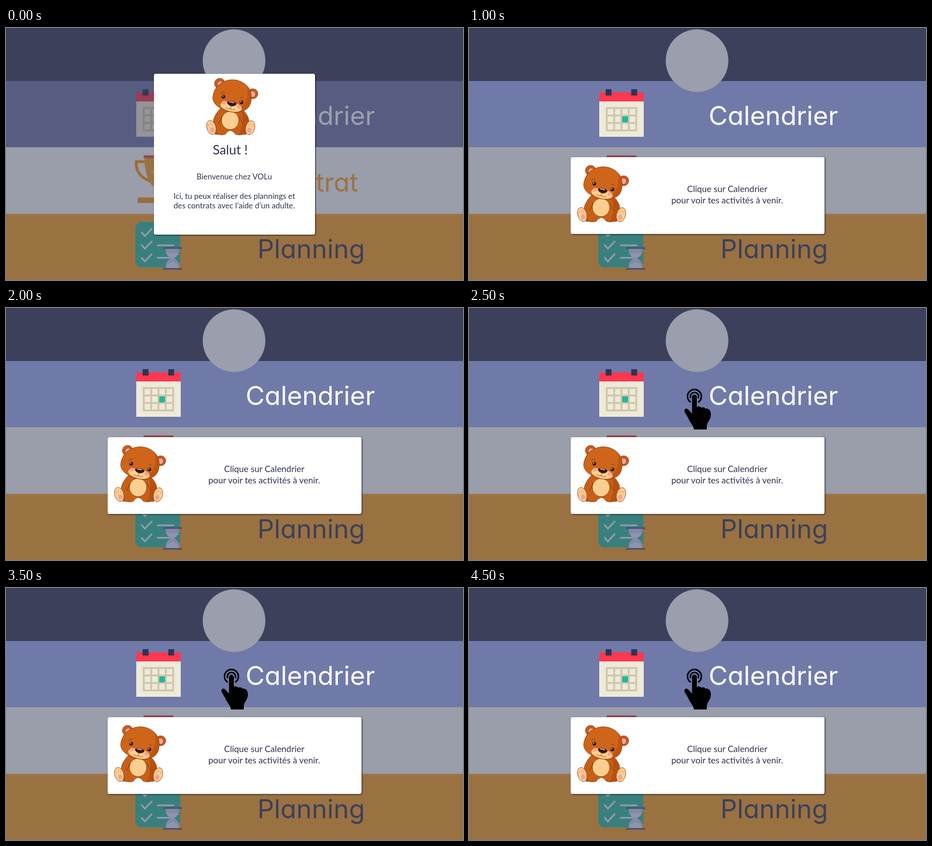
Animation, 1007 px wide and 556 px high, one loop 8000 ms. Source, as an HTML page:

```html
<!DOCTYPE html>
<html lang="fr">
<head>
<meta charset="utf-8">
<title>Accueil</title>
<style>
  html, body { margin: 0; width: 100%; height: 100%; overflow: hidden; }
  svg { display: block; width: 100%; height: 100%; }
  .title { font: 57.5px Inter, sans-serif; font-feature-settings: "cv11"; }
  .note { font: 17.3px Lato, sans-serif; fill: #30344f; text-anchor: middle; }
  .hint { font-size: 19.3px; }
  .hello { font-size: 28.5px; }
  .dim { fill: #3d405b; fill-opacity: .5; }
  .card { fill: #fff; filter: drop-shadow(1.5px 1.5px 1.6px rgba(0, 0, 0, .9)); }
</style>
</head>
<body>
<svg viewBox="0 0 1007 556" preserveAspectRatio="none">
  <defs>
    <g id="bear" stroke="#6d2e0a" stroke-width=".8" stroke-linejoin="round">
      <g fill="#c95f17">
        <ellipse cx="24" cy="110" rx="13" ry="15"/>
        <ellipse cx="84" cy="110" rx="13" ry="15"/>
        <path d="M33 66C24 75 15 88 16 98C20 106 20 118 25 124Q34 128 43 124Q46 118 53 116Q61 118 64 124Q73 128 83 124C88 118 88 107 94 99C96 88 87 75 76 66Z"/>
      </g>
      <path d="M78 72C89 81 96 92 93 99C87 107 88 118 83 124Q77 127 72 126C81 110 82 90 78 72Z" fill="#b7500f" stroke="none"/>
      <path d="M35 84Q33 93 27 101M73 84Q75 93 81 101" fill="none"/>
      <ellipse cx="53" cy="94" rx="19" ry="20" fill="#fdcf8e"/>
      <g fill="#fdcf8e">
        <ellipse cx="11.500" cy="109.500" rx="10" ry="16" transform="rotate(-15 11.500 109.500)"/>
        <ellipse cx="97" cy="110" rx="10" ry="16" transform="rotate(15 97 110)"/>
      </g>
      <g fill="#f3a09b" stroke="none">
        <ellipse cx="13.500" cy="115" rx="4.500" ry="6"/>
        <ellipse cx="95" cy="115.500" rx="4.500" ry="6"/>
        <circle cx="5.500" cy="105" r="1.800"/><circle cx="9.500" cy="101" r="1.800"/><circle cx="14.500" cy="104" r="1.800"/>
        <circle cx="94" cy="104.500" r="1.800"/><circle cx="99" cy="101.500" r="1.800"/><circle cx="103" cy="105.500" r="1.800"/>
      </g>
      <circle cx="30" cy="12.500" r="11.500" fill="#c95f17"/>
      <circle cx="31.500" cy="14" r="7" fill="#f4a5a0"/>
      <circle cx="103" cy="35" r="11" fill="#c95f17"/>
      <circle cx="102" cy="36" r="7" fill="#f4a5a0"/>
      <path d="M57 4C75 4 92 14 98 30C102 46 99 63 88 70C74 78 52 78 36 69C20 62 13 51 15 40C18 20 34 5 57 4Z" fill="#cf6519"/>
      <path d="M90 18C99 27 101 44 97 56C92 70 77 76 62 75C84 69 96 44 90 18Z" fill="#bd560f" stroke="none"/>
      <ellipse cx="55" cy="63.500" rx="24" ry="10.500" transform="rotate(13 55 63.500)" fill="#fdcf8e" stroke="none"/>
      <g fill="#f3a09b" stroke="none">
        <ellipse cx="39.500" cy="54.500" rx="5" ry="4"/>
        <ellipse cx="72" cy="64" rx="5" ry="4"/>
      </g>
      <path d="M46 54C48 50 64 52 67 57C66 62 59 63 54 62Q47 59 46 54Z" fill="#38160b"/>
      <path d="M51 53.500Q56 52.500 61 55.500" fill="none" stroke="#fff" stroke-width="1.500"/>
      <path d="M55 62L53 68M43 65Q48 70 53 68Q59 72 64 69M31 34Q35 30 41 32M76 43Q81 42 84 46" fill="none"/>
      <g stroke="none">
        <circle cx="38" cy="41.500" r="4.200" fill="#2b120b"/><circle cx="78" cy="54" r="4.200" fill="#2b120b"/>
        <circle cx="36.800" cy="40" r="1.300" fill="#fff"/><circle cx="76.800" cy="52.500" r="1.300" fill="#fff"/>
      </g>
    </g>
  </defs>

  <rect width="1007" height="118" fill="#3d405b"/>
  <rect y="117" width="1007" height="147" fill="#707aa9"/>
  <rect y="263" width="1007" height="147" fill="#f9fcfb"/>
  <rect y="410" width="1007" height="146" fill="#f9a62b"/>

  <g id="calendar">
    <rect x="287" y="142" width="98" height="98" fill="#eeead9"/>
    <path d="M287 142H385V162H287Z" fill="#ff3750"/>
    <path d="M301 135h13v14h-13zM357.500 135h13v14h-13z" fill="#2e3453"/>
    <path d="M303.500 176.500H368.500V226H303.500ZM303.500 193H368.500M303.500 209.500H368.500M320 176V226M336 176V226M352 176V226" fill="none" stroke="#cfc6ab" stroke-width="4"/>
    <rect x="337.500" y="195" width="13" height="13" fill="#20b89b"/>
  </g>

  <g id="trophy">
    <path d="M312 295H287C285 318 300 333 322 339" fill="none" stroke="#f99a10" stroke-width="6"/>
    <path d="M305 287H368V320Q366 354 336 355Q307 349 305 287Z" fill="#f9a62b"/>
    <rect x="303" y="281" width="66" height="6" rx="2" fill="#f05038"/>
    <path d="M290 386V377Q290 374 294 374H378Q382 374 382 377V386Z" fill="#f99a10"/>
    <path d="M318 316L327 314V322Z" fill="#f7df58"/>
  </g>

  <g id="checklist">
    <rect x="285" y="428" width="99" height="100" rx="13" fill="#34c2a4"/>
    <path d="M299 451l7 8 15-16M299 479l7 8 15-16M299 507l7 8 15-16M334 479.500H369M334 507H369" fill="none" stroke="#f8fafa" stroke-width="3.500" stroke-linecap="round"/>
    <path d="M352 486H382V494Q381 502 371 508Q381 515 382 523V531H352V523Q353 515 363 508Q353 502 352 494Z" fill="#cad6f6"/>
    <path d="M355 497H379Q376 503 367 508Q358 503 355 497ZM353 531Q354 521 367 517Q380 521 381 531Z" fill="#e4ecff"/>
    <path d="M346 485.500H388M346 531.500H388" stroke="#565d8c" stroke-width="3.500"/>
  </g>

  <text class="title" x="528" y="214" fill="#fff">Calendrier</text>
  <text class="title" x="776" y="361" fill="#f9a62b" text-anchor="end">Contrat</text>
  <text class="title" x="554" y="508" fill="#3d405b">Planning</text>

  <path class="dim" d="M0 0H1007V117H0ZM0 263H1007V556H0Z"/>
  <rect class="dim" id="bandDim" y="117" width="1007" height="146"/>
  <circle cx="502.500" cy="72" r="69" fill="#9b9eac"/>

  <g id="welcome">
    <rect class="card" x="326" y="101" width="355" height="355" rx="4"/>
    <use href="#bear" x="441" y="110"/>
    <text class="note hello" x="494" y="279">Salut !</text>
    <text class="note" x="503" y="334">Bienvenue chez VOLu</text>
    <text class="note" x="503" y="377">Ici, tu peux réaliser des plannings et</text>
    <text class="note" x="503" y="398">des contrats avec l’aide d’un adulte.</text>
  </g>

  <g id="guide">
    <rect class="card" x="224" y="285" width="559.500" height="169.500" rx="4"/>
    <use href="#bear" x="238" y="302"/>
    <text class="note hint" x="569" y="362">Clique sur Calendrier</text>
    <text class="note hint" x="569" y="387">pour voir tes activités à venir.</text>
  </g>

  <g id="hand">
    <path d="M488.500 208A15.300 15.300 0 1 1 505 208M488.500 199A9 9 0 1 1 505 199" fill="none" stroke="#000" stroke-width="3.400"/>
    <path d="M491.500 196.500A5.200 5.200 0 0 1 502 196.500V218C506 216 510 217 511.500 220C515 218 519 219 521 222C528 221 533 226 533 235C533 246 525 252 524 259V268H495.500C495 259 487 253 483 243L475 229C473 223 479 219 484 225L491.500 233Z"/>
  </g>
</svg>
<script>
  const LOOP = 8000, BLINK = 500, BLINK_END = 4500;
  const show = (id, on) =>
    document.getElementById(id).setAttribute('visibility', on ? 'visible' : 'hidden');

  function render(time) {
    const t = time % LOOP;
    const step = Math.floor(t / BLINK);
    const intro = step === 0;
    show('welcome', intro);
    show('bandDim', intro);
    show('guide', !intro);
    show('hand', t >= BLINK_END || step % 2 === 1);
  }

  const start = performance.now();
  function tick() {
    render(performance.now() - start);
    requestAnimationFrame(tick);
  }
  tick();
</script>
</body>
</html>
```
